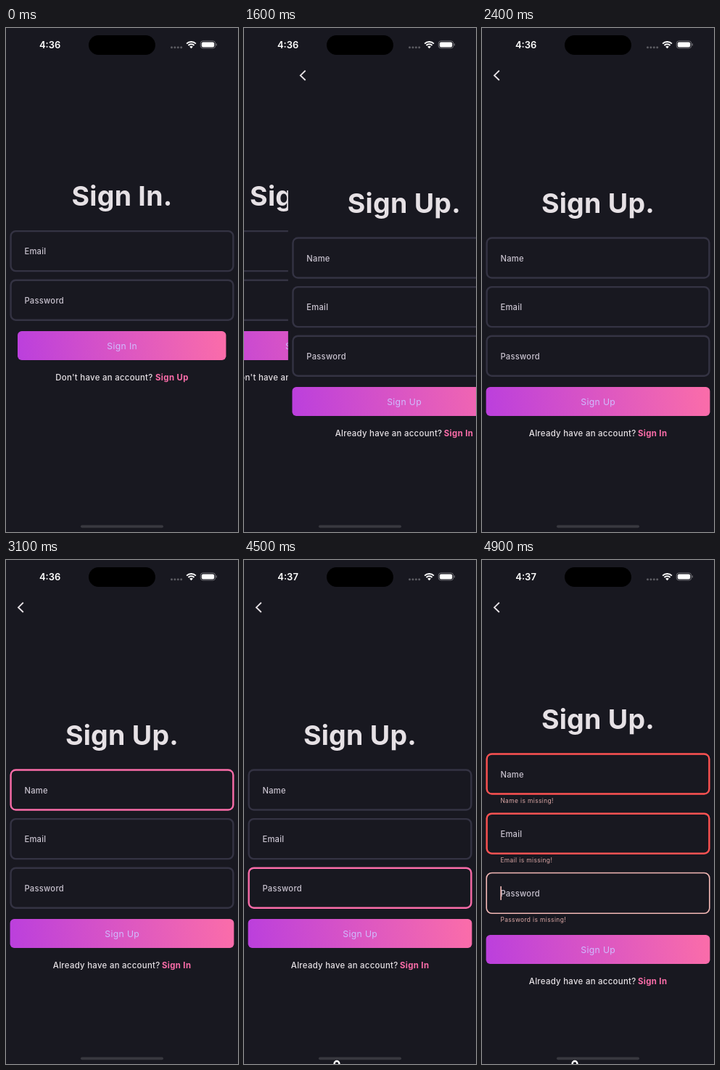
Recreate the animation shown at these times as an HTML page with a canvas. Size 320x695 px, loop 5 s.

```html
<!DOCTYPE html>
<html lang="en">
<head>
<meta charset="utf-8">
<title>Sign in and sign up</title>
<style>
  html, body { margin: 0; width: 100%; height: 100%; overflow: hidden; background: #181820; }
  canvas { display: block; width: 320px; height: 695px; }
</style>
</head>
<body>
<canvas id="stage"></canvas>
<script>
const W = 320, H = 695, LOOP = 5000, STEP = 100;
const canvas = document.getElementById('stage');
const ctx = canvas.getContext('2d');
const dpr = window.devicePixelRatio || 1;
canvas.width = W * dpr;
canvas.height = H * dpr;

const BG = '#181820', INK = '#e6e1e5', HINT = '#cac4d0', LILAC = '#d0bcff';
const LINE = [52, 51, 67], PINK = [251, 109, 169], RED = [255, 82, 82], ROSE = [242, 184, 181];
const PURPLE = [187, 63, 221], CARET = [176, 127, 224];

// Event times in ms
const SHOW_PAGE = 1600, SLIDE_START = 1433, SLIDE_TIME = 500;
const FOCUS = [2405, 3230, 3790], SUBMIT = 4650, FADE = 167;
const POINTER = 4000, MINUTE = 4300;

const clamp = v => Math.min(1, Math.max(0, v));
const mix = (a, b, k) => a + (b - a) * k;
const mixColor = (a, b, k) => a.map((v, i) => mix(v, b[i], k));
const rgb = (c, alpha = 1) => `rgba(${c.map(Math.round).join(',')},${alpha})`;

function bezier(x1, y1, x2, y2) {
  const at = (a, b, s) => 3 * (1 - s) ** 2 * s * a + 3 * (1 - s) * s * s * b + s ** 3;
  return x => {
    if (x <= 0 || x >= 1) return clamp(x);
    let lo = 0, hi = 1;
    for (let i = 0; i < 30; i++) {
      const mid = (lo + hi) / 2;
      if (at(x1, x2, mid) < x) lo = mid; else hi = mid;
    }
    return at(y1, y2, lo);
  };
}

const ease = bezier(0.4, 0, 0.2, 1);
const leaveEase = bezier(0.35, 0.91, 0.33, 0.97);

// Two joined curves: quick start, long settle
const MID = { x: 0.198, y: 0.541 };
const enterHead = bezier(0.056 / MID.x, 0.024 / MID.y, 0.108 / MID.x, 0.3085 / MID.y);
const enterTail = bezier(0.209, 1, 0.4345, 0.976);
const enterEase = x => x < MID.x
  ? MID.y * enterHead(x / MID.x)
  : MID.y + (1 - MID.y) * enterTail((x - MID.x) / (1 - MID.x));

const since = (t, start) => ease(clamp((t - start) / FADE));

function blink(age) {
  const p = (age % 1000) / 1000;
  if (p < 0.5) return 1;
  return p < 0.75 ? clamp((0.65 - p) / 0.15) : clamp((p - 0.85) / 0.15);
}

function text(str, x, y, size, { weight = 400, color = INK, gap = 0, align = 'left' } = {}) {
  ctx.font = `${weight} ${size}px Inter, "Liberation Sans", sans-serif`;
  ctx.letterSpacing = gap + 'px';
  ctx.textAlign = align;
  ctx.fillStyle = color;
  ctx.fillText(str, x, y);
}

function pill(x, y, w, h, r) {
  ctx.beginPath();
  ctx.roundRect(x, y, w, h, r);
}

function fillPill(x, y, w, h, r, color) {
  pill(x, y, w, h, r);
  ctx.fillStyle = color;
  ctx.fill();
}

function title(str, y) {
  text(str, 160, y, 37.5, { weight: 700, gap: 0.25, align: 'center' });
}

function field(label, mid, color = LINE, width = 2.4) {
  const edge = 5.4 + width / 2, top = mid - 28.7 + width / 2;
  pill(edge, top, W - 2 * edge, 57.4 - width, 8.1 - width / 2);
  ctx.strokeStyle = rgb(color);
  ctx.lineWidth = width;
  ctx.stroke();
  text(label, 25.4, mid + 4.7, 11.2, { weight: 500, color: HINT, gap: 0.27 });
}

function button(label, x, y, w) {
  const g = ctx.createLinearGradient(x, y + 40, x + w, y);
  g.addColorStop(0, rgb(PURPLE));
  g.addColorStop(1, rgb(PINK));
  fillPill(x, y, w, 40, 5.7, g);
  text(label, 160.2, y + 24.5, 12.2, { color: LILAC, gap: 0.35, align: 'center' });
}

function link(question, x, action, ax, y) {
  text(question, x, y, 11.4, { weight: 500, gap: 0.29 });
  text(action, ax, y, 11.4, { weight: 700, color: rgb(PINK), gap: 0.38 });
}

function signIn() {
  title('Sign In.', 245.3);
  field('Email', 307.6);
  field('Password', 375.2);
  button('Sign In', 16, 418, 287.5);
  link("Don't have an account?", 68.2, 'Sign Up', 206, 485.7);
}

function signUp(t) {
  const failed = t >= SUBMIT;
  const shift = failed ? 22 : 0;
  const err = since(t, SUBMIT);

  ctx.strokeStyle = INK;
  ctx.lineWidth = 1.9;
  ctx.beginPath();
  ctx.moveTo(23.8, 58.8);
  ctx.lineTo(17, 65.4);
  ctx.lineTo(23.8, 72);
  ctx.stroke();

  title('Sign Up.', 254.5 - shift);
  ['Name', 'Email', 'Password'].forEach((label, i) => {
    const mid = 317 - shift + i * (failed ? 82.2 : 67.6);
    const next = i < 2 ? FOCUS[i + 1] : Infinity;
    const lit = since(t, FOCUS[i]) * (1 - since(t, next));
    const last = i === 2;
    const color = mixColor(mixColor(LINE, PINK, lit), last ? ROSE : RED, err);
    field(label, mid, color, last ? mix(2.4, 1.6, err) : 2.4);
    if (t >= FOCUS[i] && t < next) {
      ctx.fillStyle = rgb(failed ? ROSE : CARET, blink(t - FOCUS[i]));
      ctx.fillRect(25.3, mid - 9.5, 1.6, 19);
    }
    if (failed) {
      text(label + ' is missing!', 25.4, mid + 40 - 2.5 * (1 - err), 8.4,
        { color: rgb(ROSE, err * 0.9), gap: 0.4 });
    }
  });
  button('Sign Up', 5.6, 495 + shift, 308.8);
  link('Already have an account?', 64.8, 'Sign In', 214.9, 562.5 + shift);
}

function chrome(t) {
  text(t < MINUTE ? '4:36' : '4:37', 60.6, 28, 13,
    { weight: 600, color: '#fff', align: 'center' });
  fillPill(114, 10, 92, 27, 13.5, '#000');

  for (let i = 0; i < 4; i++) fillPill(227 + i * 4.4, 25.2, 3, 3, 1.5, '#5c5c62');

  // Wi-Fi fan
  ctx.strokeStyle = '#fff';
  ctx.lineWidth = 2;
  for (const r of [9, 5.7]) {
    ctx.beginPath();
    ctx.arc(255.5, 28, r, -Math.PI * 0.75, -Math.PI * 0.25);
    ctx.stroke();
  }
  ctx.fillStyle = '#fff';
  ctx.beginPath();
  ctx.moveTo(255.5, 28.2);
  ctx.arc(255.5, 28.2, 3.3, -Math.PI * 0.75, -Math.PI * 0.25);
  ctx.fill();

  // Battery
  pill(268.3, 17.9, 20.4, 10, 3.3);
  ctx.strokeStyle = '#77777c';
  ctx.lineWidth = 0.9;
  ctx.stroke();
  fillPill(269.8, 19.4, 17.4, 7, 2, '#fff');
  fillPill(289.6, 21.2, 1.2, 3.4, 0.6, '#77777c');

  fillPill(103, 685.4, 114, 3.8, 1.9, '#38383f');
  if (t >= POINTER) {
    ctx.strokeStyle = '#fff';
    ctx.lineWidth = 2.4;
    ctx.beginPath();
    ctx.arc(128, 694.4, 3.4, 0, Math.PI * 2);
    ctx.stroke();
  }
}

function page(x, draw) {
  ctx.save();
  ctx.translate(x, 0);
  ctx.fillStyle = BG;
  ctx.fillRect(0, 0, W, H);
  draw();
  ctx.restore();
}

function render(t) {
  ctx.setTransform(dpr, 0, 0, dpr, 0, 0);
  ctx.fillStyle = BG;
  ctx.fillRect(0, 0, W, H);
  const k = t < SHOW_PAGE ? 0 : clamp((t - SLIDE_START) / SLIDE_TIME);
  if (k < 1) page(-W / 3 * leaveEase(k), signIn);
  if (k > 0) page(W * (1 - enterEase(k)), () => signUp(t));
  chrome(t);
}

const begin = performance.now();
function tick() {
  const t = (performance.now() - begin) % LOOP;
  render(Math.floor(t / STEP) * STEP);
  requestAnimationFrame(tick);
}
tick();
</script>
</body>
</html>
```
